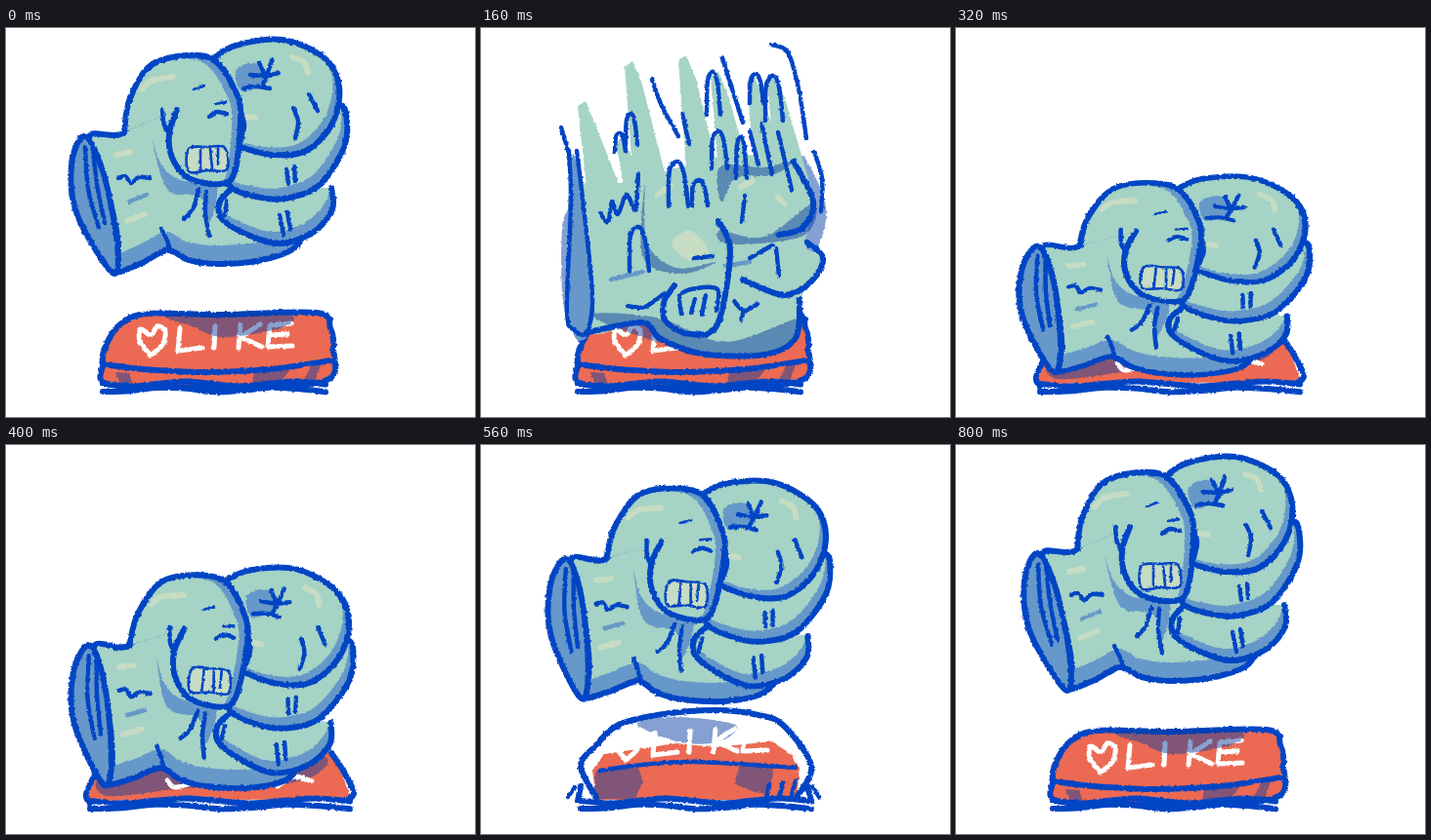
Recreate the animation shown at these times as an HTML page. Size 480 px wide and 399 px high, loop 960 ms.

```html
<!DOCTYPE html>
<html lang="en">
<head>
<meta charset="utf-8">
<title>Fist and button</title>
<style>
html, body { margin: 0; width: 100%; height: 100%; overflow: hidden; background: #fff; }
svg { display: block; width: 100%; height: 100%; }
path { fill: none; stroke-linecap: round; stroke-linejoin: round; }
.skin { fill: #a5d3c5; }
.dark { fill: #6699c9; }
.pale { fill: #c6dcc3; }
.red { fill: #ec6b52; }
.shade { fill: rgba(10, 60, 160, .48); }
.bold, .mid, .thin { stroke: #0444c4; stroke-width: 6; }
.mid { stroke-width: 4.4; }
.thin { stroke-width: 2.6; }
.tint { stroke: #6699c9; stroke-width: 4.5; }
.glow { stroke: #c6dcc3; stroke-width: 6; }
.spark { stroke: #ec6b52; stroke-width: 5; }
.white { stroke: #fff; stroke-width: 5; }
.flat .pale, .flat .glow { display: none; }
.cel { animation: show 960ms step-end infinite; animation-delay: calc(var(--i) * 80ms - 960ms); }
.cel:last-child { animation-name: hold; }
@keyframes show { 0% { visibility: visible } 8.3333%, 100% { visibility: hidden } }
@keyframes hold { 0% { visibility: visible } 16.6667%, 100% { visibility: hidden } }
</style>
</head>
<body>
<svg id="stage" viewBox="0 0 480 399" role="img" aria-label="A fist hits a LIKE button"></svg>
<script>
const same = p => p;
let warp = same, out = '', clips = 0;

// Spline through "x y x y ..."; "/" starts a new stroke.
function trace(text, closed) {
  return text.split('/').map(part => {
    const n = part.trim().split(/\s+/).map(Number), p = [];
    for (let i = 0; i < n.length; i += 2) p.push(warp([n[i], n[i + 1]]));
    const len = p.length;
    const at = i => closed ? p[(i + len) % len] : p[Math.max(0, Math.min(len - 1, i))];
    const ctrl = (a, b, c) => [0, 1].map(k => (b[k] + (c[k] - a[k]) / 6).toFixed(1));
    let d = 'M' + p[0];
    for (let i = 0; i < (closed ? len : len - 1); i++) {
      const a = at(i), b = at(i + 1);
      d += `C${ctrl(at(i - 1), a, b)} ${ctrl(at(i + 2), b, a)} ${b}`;
    }
    return d;
  }).join('');
}
const put = (style, d, more = '') => out += `<path class="${style}" d="${d}" ${more}/>`;
const line = (style, text) => put(style, trace(text));
const blob = (style, text) => put(style, trace(text, true));
const poly = (style, text) => put(style, 'M' + text + 'Z');

// Outlined part whose shaded rim is what a shifted copy leaves bare.
function form(text, dx, dy, closed) {
  const d = trace(text, closed), id = 'clip' + clips++;
  out += `<clipPath id="${id}"><path d="${d}"/></clipPath>`;
  put('dark', d);
  out += `<g clip-path="url(#${id})">`;
  put('skin', d, `transform="translate(${dx} ${dy})"`);
  out += '</g>';
  put('bold', d);
}

function arm() {
  form('88 112 124 107 150 60 210 60 238 160 300 200 300 224 265 238 220 242 190 238 168 228 140 242 113 250 118 222 106 165', -2, -19, true);
  blob('dark', '152 112 162 140 182 156 218 160 211 200 202 174 168 165');
  blob('dark bold', '84 111 70 140 76 192 112 251 117 222 103 150');
  line('mid', '84 122 87 165 98 205 / 92 122 96 160 104 200');
  line('mid', '162 206 167 216 172 230');
  line('mid', '118 154 125 152 131 159 139 153 150 154');
  line('mid', '185 196 194 186 200 166 / 208 168 207 190 211 213');
  line('tint', '129 178 147 171');
  line('glow', '116 130 130 127 / 127 198 145 191');
}

function fingers() {
  form('232 166 221 180 225 197 255 214 285 221 318 209 337 186 336 164', -5, -12);
  form('300 90 343 78 352 97 348 125 325 160 298 173 270 175 232 162 238 130', -6, -11);
  form('214 32 238 18 285 12 328 30 344 60 337 98 310 126 275 130 242 122', -7, -8);
  blob('dark', '238 44 258 36 272 52 258 62 243 64');
  line('mid', '246 62 258 60 273 62 / 253 48 268 49 282 46');
  line('mid', '262 36 268 48 / 275 33 270 48 265 60');
  line('mid', '244 86 247 100 244 115 / 297 82 302 96 299 113 / 313 68 322 85');
  line('mid', '290 145 292 159 / 298 142 299 157');
  line('mid', '283 192 287 212 / 291 189 294 206 / 229 178 227 192');
  line('glow', '296 30 308 35 312 46 / 250 91 258 92');
}

function thumb() {
  form('124 107 130 72 155 36 210 30 238 65 243 95 237 148 222 160 190 154 173 133 170 108 178 84', -9, 3.8);
  line('mid', '163 84 165 100 171 110');
  line('mid', '211 91 219 86 229 88');
  line('thin', '195 63 206 59 / 217 78 228 76');
  blob('pale thin', '190 124 209 122 227 123 229 145 210 146 190 147');
  line('thin', '202 124 202 146 / 212 124 214 144 / 220 123 220 140');
  line('glow', '142 63 152 54 174 50');
}

function fist() { arm(); fingers(); thumb(); }

// Knuckles sink while the lower fingers bulge to the right.
function squash() {
  warp = ([x, y]) => [
    x - 7 + .003 * Math.max(0, x - 220) * Math.max(0, Math.min(y, 180) - 50),
    155 + .76 * y - (y < 213 ? 9 * Math.sin(Math.PI * (y - 13) / 200) : 0)
  ];
  out += '<g class="flat">';
  fist();
  out += '</g>';
  warp = same;
}

const spike = (x, top) =>
  poly('skin', `${x - 5} ${top + 5}L${x + 3} ${top}L${x + 13} ${top + 24}L${x + 42} 172L${x + 5} 172`);
const arch = (x, y, w, h) =>
  line('mid', `${x} ${y + h} ${x + 1} ${y + h * .2} ${x + w / 2} ${y} ${x + w * .8} ${y + h * .3} ${x + w} ${y + h}`);

function smear() {
  blob('shade', '84 198 98 192 116 250 112 312 92 309 83 270');
  blob('shade', '325 130 352 178 347 220 330 230');
  spike(104, 75); spike(152, 34); spike(207, 28); spike(240, 45);
  spike(277, 50); spike(298, 48); spike(143, 112);
  blob('skin', '100 165 150 158 200 144 260 130 322 140 340 175 332 222 349 238 328 276 326 312 300 332 230 335 185 320 165 302 108 312 96 250');
  blob('dark', '94 130 88 220 94 311 110 310 112 230 104 180');
  blob('shade', '168 160 170 220 200 246 240 240 205 252 166 235');
  blob('shade', '246 178 245 142 290 143 322 135 298 151 262 153');
  blob('shade', '245 208 290 214 340 180 330 213 254 222');
  blob('shade', '112 295 180 297 250 322 326 298 300 332 205 328');
  blob('pale', '195 220 215 208 233 230 212 238');
  line('glow', '180 172 194 161 / 266 163 278 157 / 304 174 311 180');
  line('tint', '133 258 165 250 / 250 244 275 240');
  line('mid', '82 102 91 132 / 90 126 92 180 88 290 96 310 108 312 114 275 104 175 98 126');
  line('mid', '122 190 130 199 134 178 140 191 149 171 158 186 161 150');
  arch(137, 108, 11, 19); arch(148, 88, 12, 32); arch(192, 137, 20, 45); arch(216, 156, 16, 26);
  arch(231, 45, 14, 44); arch(275, 47, 14, 30); arch(291, 49, 18, 46); arch(236, 106, 16, 38);
  arch(261, 112, 11, 42); arch(152, 204, 20, 45);
  line('mid', '175 53 185 80 202 111 / 206 88 213 119 / 247 31 268 97');
  line('mid', '297 17 314 25 325 62 333 113');
  line('mid', '275 106 284 140 / 287 98 298 150 / 304 107 318 166');
  line('mid', '270 172 267 199 / 341 127 349 154 348 188');
  line('bold', '320 137 340 178 329 205 305 212');
  line('bold', '334 220 350 236 338 260 310 274 268 258');
  line('bold', '243 198 255 230 242 304 215 314 190 302 187 282 198 264');
  line('mid', '205 293 204 274 220 267 242 268 241 290 / 215 292 219 278 / 226 294 230 274');
  line('mid', '150 285 168 286 188 272 / 218 236 237 234 / 275 236 298 223 / 302 226 305 254');
  line('mid', '259 280 269 290 283 283 / 266 300 269 290');
  line('bold', '110 312 165 302 184 319 225 334 290 335 322 318 326 278');
}

// Two wobbly strokes under the button.
function base(x1, x2) {
  for (const k of [0, 1]) {
    let text = '';
    for (let i = 0; i < 9; i++)
      text += `${x1 + (x2 - x1) * i / 8} ${365 + k * 6 + 2.5 * Math.sin(i * 1.6 + k)} `;
    line('bold', text);
  }
}

function button() {
  blob('red bold', '99 345 102 326 117 304 145 293 220 294 318 292 332 308 335 328 326 362 220 368 108 366');
  poly('shade', '112 353L126 354L130 366L116 364');
  poly('shade', '254 353L292 349L280 364L252 366');
  poly('shade', '312 347L322 346L316 362L304 363');
  line('bold', '99 345 140 350 200 353 270 350 333 341');
  base(99, 327);
}
const shadow = () => blob('shade', '164 295 220 291 291 294 280 308 222 317 190 306');

function word() {
  line('white', '148 336 137 321 138 309 148 315 155 306 163 311 160 325 148 336');
  line('white', '178 308 176 331 / 176 331 201 328 / 214 306 213 328');
  line('white', '240 304 238 328 / 260 304 240 317 / 240 317 262 327');
  line('white', '292 303 270 305 / 270 305 268 327 / 268 327 293 326 / 269 315 288 314');
}

function wide() {
  poly('red', '128 292L170 285L285 284L312 293L316 362L122 366L112 347');
  blob('shade', '160 287 220 291 290 287 280 304 240 316 210 312');
  poly('shade', '96 350L126 354L130 366L98 362');
  poly('shade', '262 354L300 349L290 364L254 365');
  poly('shade', '312 347L338 344L328 360L308 360');
  line('bold', '92 350 95 327 112 306 140 294 220 295 312 290 334 304 342 323 338 344');
  line('bold', '92 347 140 351 205 353 270 350 340 342');
  base(93, 334);
}

function tall() {
  poly('red', '114 334L126 317L200 306L240 310L298 304L318 318L326 332L323 364L118 364');
  blob('shade', '160 286 200 279 258 286 256 298 235 306 200 304');
  poly('shade', '118 334L161 331L166 345L158 363L114 363');
  poly('shade', '264 330L300 329L296 358L280 356L260 348');
  line('bold', '118 362 102 329 118 308 139 288 180 277 240 272 284 277 310 288 338 329 324 360');
  line('mid', '122 334 165 328 220 325 322 331');
  line('mid', '89 361 96 351 / 346 361 339 350 / 295 348 292 362 / 309 346 305 362 / 322 344 317 362');
  line('bold', '102 350 99 365 / 334 350 338 365');
  base(102, 338);
}

function slab() {
  poly('red', '97 328L82 365L354 363L334 314');
  blob('shade', '96 342 150 334 260 340 325 320 318 338 270 350 185 352 105 360');
  line('white', '165 344 172 351 186 348 / 278 350 295 340 313 345');
  line('bold', '92 336 82 358 86 368 / 333 316 345 334 356 356 350 364');
  base(86, 352);
}

function crush() {
  poly('red', '97 330L88 361L350 360L340 328');
  blob('shade', '95 334 170 332 260 344 345 328 330 340 260 350 100 344');
  line('white', '170 334 166 350 / 166 350 187 347');
  line('tint', '125 342 136 347 / 204 342 216 349 / 235 341 255 350 / 262 345 278 346 / 290 344 308 344');
  line('spark', '75 339 73 361 / 353 333 364 358');
  line('bold', '92 342 86 363 / 343 335 350 360');
  base(88, 349);
  line('white', '307 366 332 365');
}

const moved = (how, part) => () => {
  out += `<g transform="${how}">`;
  part();
  out += '</g>';
};
const level = how => moved(how + ' matrix(1 .105 -.1 1 15 -3.5)', fist);
const rest = [button, word, shadow];

const cels = [
  [...rest, moved('translate(-3 0)', fist)],
  [...rest, moved('translate(-2 -9)', fist)],
  [button, word, smear],
  [crush, squash],
  [slab, level('translate(-6 119) scale(1.03 .9)')],
  [slab, level('translate(-2 89)')],
  [moved('translate(0 111) scale(1 .7)', tall), level('translate(-1 42)')],
  [tall, moved('translate(0 -13)', word), level('')],
  [wide, moved('translate(-15 0) scale(1.07 1)', word), fist],
  [...rest, fist],
  [...rest, fist]
];

out = `<filter id="rough" filterUnits="userSpaceOnUse" x="0" y="0" width="480" height="399">
  <feTurbulence type="fractalNoise" baseFrequency=".3" numOctaves="2" seed="4"/>
  <feDisplacementMap in="SourceGraphic" scale="3" xChannelSelector="R" yChannelSelector="G"/></filter>`;
cels.forEach((parts, i) => {
  out += `<g class="cel" style="--i:${i}" filter="url(#rough)">`;
  parts.forEach(part => part());
  out += '</g>';
});
document.getElementById('stage').innerHTML = out;
</script>
</body>
</html>
```
